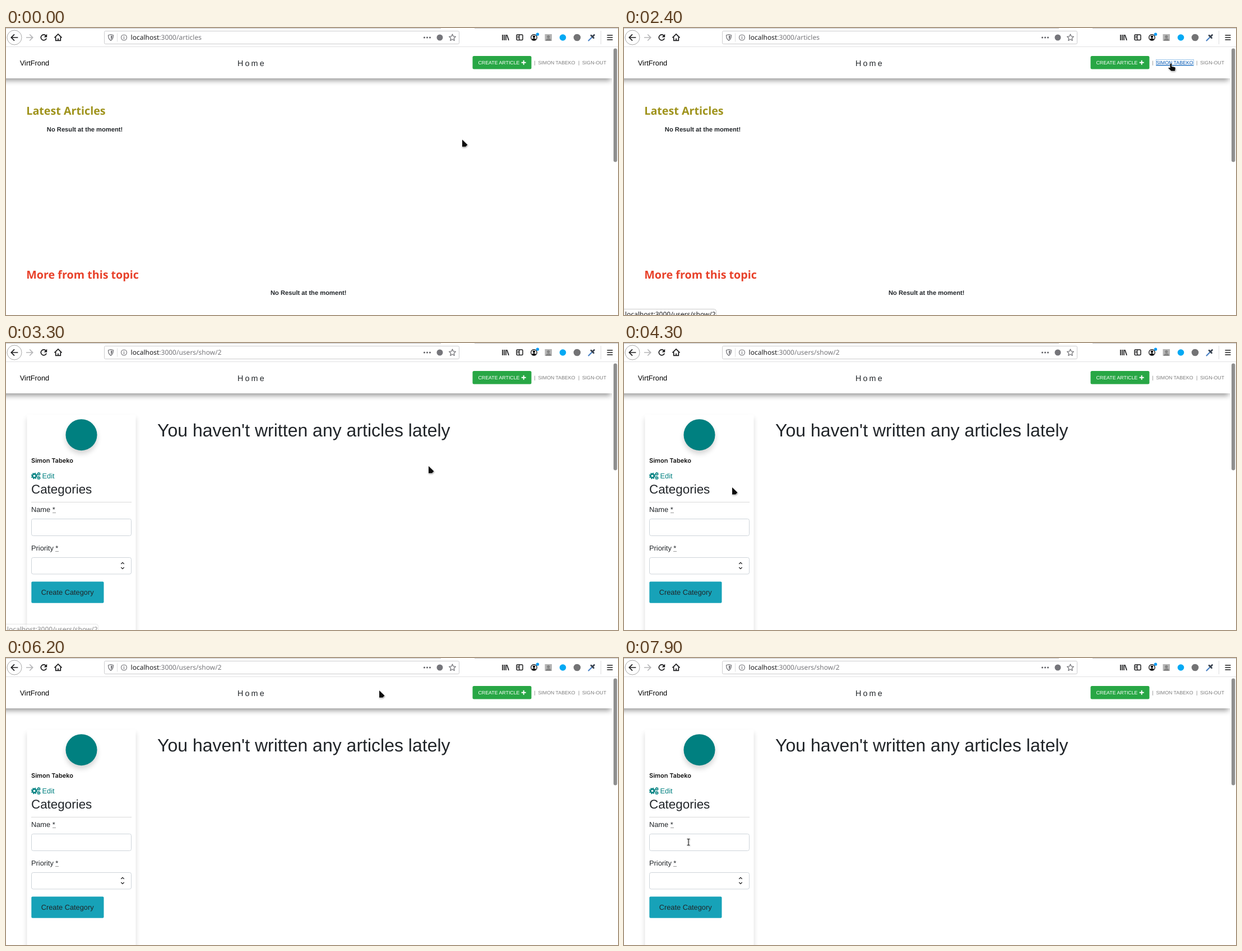
These frames come from a looping animation (1092x513 px, 8 s). An HTML page:

```html
<!DOCTYPE html>
<html lang="en">
<head>
<meta charset="utf-8">
<title>Articles</title>
<style>
  html, body { margin: 0; width: 100%; height: 100%; overflow: hidden; background: #fff; }
  svg { display: block; width: 1092px; height: 513px; }
  text { font-family: "Liberation Sans", Arial, sans-serif; font-size: 12.8px; fill: #212529; text-rendering: geometricPrecision; white-space: pre; }
  .ui { font-family: "Noto Sans", sans-serif; font-size: 12px; fill: #76767a; }
  .nav { font-size: 8.8px; fill: #7f7f7f; }
  .title { font-family: "Noto Sans", "Open Sans", sans-serif; font-weight: 700; font-size: 19.7px; }
  .note { font-weight: 700; font-size: 11.2px; }
  .ico { fill: none; stroke: #1b1b1d; stroke-width: 1.7; }
  .gray { stroke: #75757a; stroke-width: 1.3; }
  .line { fill: #fff; stroke: #ced4da; }
  .hover { fill: #0056b3; text-decoration: underline; }
</style>
</head>
<body>
<svg viewBox="0 0 1092 513">
  <defs>
    <filter id="soft" x="-20%" y="-40%" width="140%" height="180%"><feGaussianBlur stdDeviation="5"/></filter>
    <filter id="drop" x="-60%" y="-60%" width="260%" height="260%"><feDropShadow dx=".6" dy="1.2" stdDeviation="1" flood-opacity=".4"/></filter>
    <clipPath id="view"><rect y="34" width="1082" height="479"/></clipPath>
    <path id="cog" d=""/>
  </defs>
  <rect width="1092" height="513" fill="#fff"/>

  <g id="list">
    <text class="title" x="36.3" y="155" style="fill:#9f931c">Latest Articles</text>
    <text class="note" x="72.8" y="185.2">No Result at the moment!</text>
    <text class="title" x="36.3" y="448" style="fill:#e8412a">More from this topic</text>
    <text class="note" x="472" y="477">No Result at the moment!</text>
  </g>

  <g id="profile">
    <rect x="37.5" y="134" width="194" height="420" opacity=".15" filter="url(#soft)"/>
    <rect x="37.5" y="128" width="194" height="420" fill="#fff"/>
    <circle cx="134.5" cy="170" r="28" opacity=".17" filter="url(#soft)"/>
    <circle cx="134.5" cy="164.2" r="28" fill="#008080"/>
    <text x="45" y="213.5" style="font:600 11px Inter,sans-serif;fill:#111">Simon Tabeko</text>
    <g fill="none" stroke="#008080">
      <circle cx="50.5" cy="237.5" r="3.2" stroke-width="2.4"/>
      <circle cx="50.5" cy="237.5" r="4.9" stroke-width="1.7" stroke-dasharray="2.1 1.75"/>
      <g id="small">
        <circle cx="58.5" cy="234" r="1.7" stroke-width="1.4"/>
        <circle cx="58.5" cy="234" r="2.7" stroke-width="1.1" stroke-dasharray="1.5 1.33"/>
      </g>
      <use href="#small" y="7.2"/>
    </g>
    <text x="64.5" y="242" style="fill:#008080">Edit</text>
    <text x="45" y="269" style="font-size:22.4px">Categories</text>
    <path d="M45 284.5H224" stroke="#d9d9d9" stroke-width="1.2"/>
    <text x="45" y="302">Name *</text>
    <text x="45" y="371">Priority *</text>
    <path d="M83.5 303.5h5M88.5 372.5h5" stroke="#333" stroke-dasharray="1 1"/>
    <rect class="line" x="45.5" y="314.5" width="178" height="30" rx="3"/>
    <rect class="line" x="45.5" y="383.5" width="178" height="29.5" rx="3"/>
    <path class="ico" style="stroke-width:1.2" d="M205.3 395l2.7-2.7 2.7 2.7M205.3 401l2.7 2.7 2.7-2.7"/>
    <rect x="45.3" y="426.5" width="129.2" height="38.3" rx="2" fill="#17a2b8"/>
    <text x="62.7" y="450">Create Category</text>
    <text x="270" y="167" style="font-size:32px">You haven't written any articles lately</text>
  </g>

  <g clip-path="url(#view)">
    <rect x="-30" y="50" width="1109" height="44" opacity=".4" filter="url(#soft)"/>
    <rect y="33" width="1082" height="57" fill="#fff"/>
  </g>
  <text x="24.8" y="66.5" style="fill:#000">VirtFrond</text>
  <text x="413" y="68" style="font-size:14.4px;letter-spacing:3.1px">Home</text>
  <rect x="832.5" y="50" width="105" height="23.6" rx="2.5" fill="#28a745"/>
  <text class="nav" x="842.5" y="65" style="fill:#fff">CREATE ARTICLE</text>
  <path d="M919.7 61.7h8M923.7 57.7v8" stroke="#fff" stroke-width="1.9"/>
  <text class="nav" x="942.6" y="65">|</text>
  <text class="nav" id="user" x="949.5" y="65">SIMON TABEKO</text>
  <text class="nav" x="1021" y="65">|</text>
  <text class="nav" x="1028" y="65">SIGN-OUT</text>
  <rect id="focus" x="949.5" y="56.5" width="67" height="11" fill="none" stroke="#3d8fd6" stroke-dasharray="1 1"/>
  <rect id="thumb" x="1084" y="36.5" width="6.4" height="203" rx="3.2" fill="#8f8f8f"/>

  <rect width="1092" height="33" fill="#fff"/>
  <path d="M0 .5H776M836 .5H1092" stroke="#c4c4c6"/>
  <path d="M0 33.5H1092" stroke="#e1e1e3"/>
  <circle cx="15" cy="17" r="13" fill="#fdfdfd" stroke="#aaa"/>
  <path id="back" class="ico" d="M21.3 17H9.7M15 11.4L9.3 17l5.7 5.6"/>
  <path class="ico" style="stroke:#b5b5b7" d="M36 17h11.3M42.2 11.5l5.5 5.5-5.5 5.5"/>
  <path class="ico" d="M71.2 13.8a5 5 0 1 0 .9 4.6"/>
  <path d="M73.2 10.8v5.6h-5.6z" fill="#1b1b1d"/>
  <path class="ico" d="M86.5 17.4L93 11l6.5 6.4M88.7 16.4v6h8.6v-6M93 22.5v-4"/>
  <rect x="175.5" y="5.5" width="633" height="23" rx="2" fill="#fff" stroke="#ccccce"/>
  <path class="ico gray" d="M187 11.6l4.5 1.4c0 5-1 7.300-4.500 9.400c-3.500-2.100-4.500-4.400-4.500-9.400z"/>
  <path d="M187 13.500v7c2-1.500 2.700-3.500 2.800-6.300z" fill="#75757a"/>
  <path d="M198.500 9.500v15M1061.500 5v24" stroke="#dcdcde"/>
  <circle class="ico gray" style="stroke-width:1.1" cx="210.500" cy="17" r="5"/>
  <path class="ico gray" d="M210.500 16.300v3.500M210.500 14v1.300"/>
  <text class="ui" x="222.600" y="21.300"><tspan fill="#1b1b1d">localhost</tspan>:3000<tspan id="path"></tspan></text>
  <g fill="#65656a"><circle cx="746.500" cy="17" r="1.600"/><circle cx="751.500" cy="17" r="1.600"/><circle cx="756.500" cy="17" r="1.600"/></g>
  <circle cx="774" cy="17" r="5.500" fill="#75757a"/>
  <path id="star" class="ico gray" stroke-linejoin="round"/>
  <path class="ico" d="M886 12v10M889 12v10M892 12v10M893.800 12.300l3.200 9.700"/>
  <rect class="ico" style="stroke-width:1.500" x="911" y="12" width="11" height="9.500" rx="1.500"/>
  <path class="ico" style="stroke-width:1.300" d="M916 12v9.500M912.500 15h2.500M912.500 17.500h2.500"/>
  <circle class="ico" style="stroke-width:1.400" cx="942" cy="17" r="5.300"/>
  <circle cx="942" cy="15.600" r="2.200"/><path d="M938.300 20.300q3.700-4 7.400 0q-3.700 3-7.400 0z"/>
  <circle cx="948.500" cy="11.200" r="2.700" fill="#0a9cf5"/>
  <rect x="961.500" y="11" width="12.500" height="12" fill="#b4b4b4"/>
  <path d="M963 23q0-4 4.800-4.500t4.700 4.500z" fill="#858585"/><circle cx="967.800" cy="15.600" r="2.600" fill="#858585"/>
  <circle cx="993.500" cy="17" r="5.800" fill="#03a9f4"/>
  <circle cx="1019" cy="17" r="6.300" fill="#737375"/>
  <path d="M1039.500 22.500l6-6" stroke="#4b82c4" stroke-width="2.200" stroke-linecap="round"/>
  <path d="M1044 13.300l4.500 4.500M1046.800 15.200l2.700-2.700" stroke="#39424f" stroke-width="2.800" stroke-linecap="round"/>
  <path class="ico" style="stroke-width:1.500" d="M1072.500 13h10M1072.500 17h10M1072.500 21h10"/>

  <g id="status">
    <path d="M-1 502.500H160.500a4 4 0 0 1 4 4V515H-1z" fill="#fff" stroke="#ccc"/>
    <text class="ui" x="1.800" y="516" style="fill:#1b1b1d">localhost:3000/users/show/2</text>
  </g>

  <g id="cursor" filter="url(#drop)">
    <path id="arrow" d="M0 0L9.500 9.200L6 12.800H0z" fill="#111" stroke="#fff" stroke-width=".8" stroke-linejoin="round" paint-order="stroke"/>
    <path id="hand" d="M-1.600 1a1.400 1.400 0 0 1 2.800 0v4l5.300 1q1.500.400 1.300 2l-.700 4.800h-6.600l-4.800-4.600q-.900-1.300.500-1.500l2.200.900z" fill="#111" stroke="#fff" stroke-width=".8" paint-order="stroke"/>
    <path id="beam" d="M-2.500-5.500H2.500M-2.500 5.500H2.500M0-5.500V5.500" fill="none" stroke="#222" stroke-width="1.100"/>
  </g>
</svg>
<script>
const $ = id => document.getElementById(id);
const show = (id, on) => { $(id).style.display = on ? "" : "none"; };

$("star").setAttribute("d", "M" + Array.from({ length: 10 }, (_, i) => {
  const a = i * Math.PI / 5 - Math.PI / 2, r = i % 2 ? 2.9 : 6.2;
  return `${(796.5 + r * Math.cos(a)).toFixed(2)} ${(17.3 + r * Math.sin(a)).toFixed(2)}`;
}).join("L") + "z");

// time, x, y of the pointer's hot spot
const track = [
  [400, 814, 199.5], [700, 850, 178], [1100, 948, 105], [1300, 971, 82.500],
  [1700, 976, 64], [2700, 976, 64], [3000, 918, 106], [3300, 754, 220],
  [3500, 535, 280], [3600, 486, 288], [3800, 486, 288], [4000, 239, 287],
  [4200, 239, 287], [4300, 193, 258], [4400, 238, 258], [4500, 238, 258],
  [4600, 320, 236], [4700, 396, 255], [5200, 396, 255], [5300, 424, 217],
  [5400, 424, 217], [5700, 490, 150], [6100, 652, 44], [6200, 666, 58],
  [6300, 674, 60], [6400, 677, 60], [6500, 677, 60], [6800, 510, 130],
  [7000, 310, 235], [7200, 195, 278], [7400, 195, 278], [7700, 138, 323], [7900, 115, 329]
];

function pointer(t) {
  const i = track.findIndex(p => p[0] >= t);
  if (i < 0) return track[track.length - 1].slice(1);
  if (i === 0) return track[0].slice(1);
  const [t0, x0, y0] = track[i - 1], [t1, x1, y1] = track[i];
  const k = (t - t0) / (t1 - t0);
  return [x0 + (x1 - x0) * k, y0 + (y1 - y0) * k];
}

const inside = (x, y, l, t, r, b) => x >= l && x <= r && y >= t && y <= b;

function draw(now) {
  const t = Math.floor(now % 8000 / 100) * 100;
  const [x, y] = pointer(t);
  const profile = t >= 2800;
  const link = !profile && inside(x, y, 949, 56, 1017, 70);
  const field = profile && inside(x, y, 45, 314, 224, 345);

  show("list", !profile);
  show("profile", profile);
  $("path").textContent = profile ? "/users/show/2" : "/articles";
  $("thumb").setAttribute("height", profile ? 191 : 203);
  $("user").classList.toggle("hover", link);
  show("focus", t >= 2400 && !profile);
  $("status").style.opacity = t < 1600 ? 0 : Math.max(0, Math.min(1, (3500 - t) / 400));

  $("cursor").setAttribute("transform", `translate(${x} ${y})`);
  show("hand", link);
  show("beam", field);
  show("arrow", !link && !field);
}

const start = performance.now();
function loop() {
  draw(performance.now() - start);
  requestAnimationFrame(loop);
}
loop();
</script>
</body>
</html>
```
